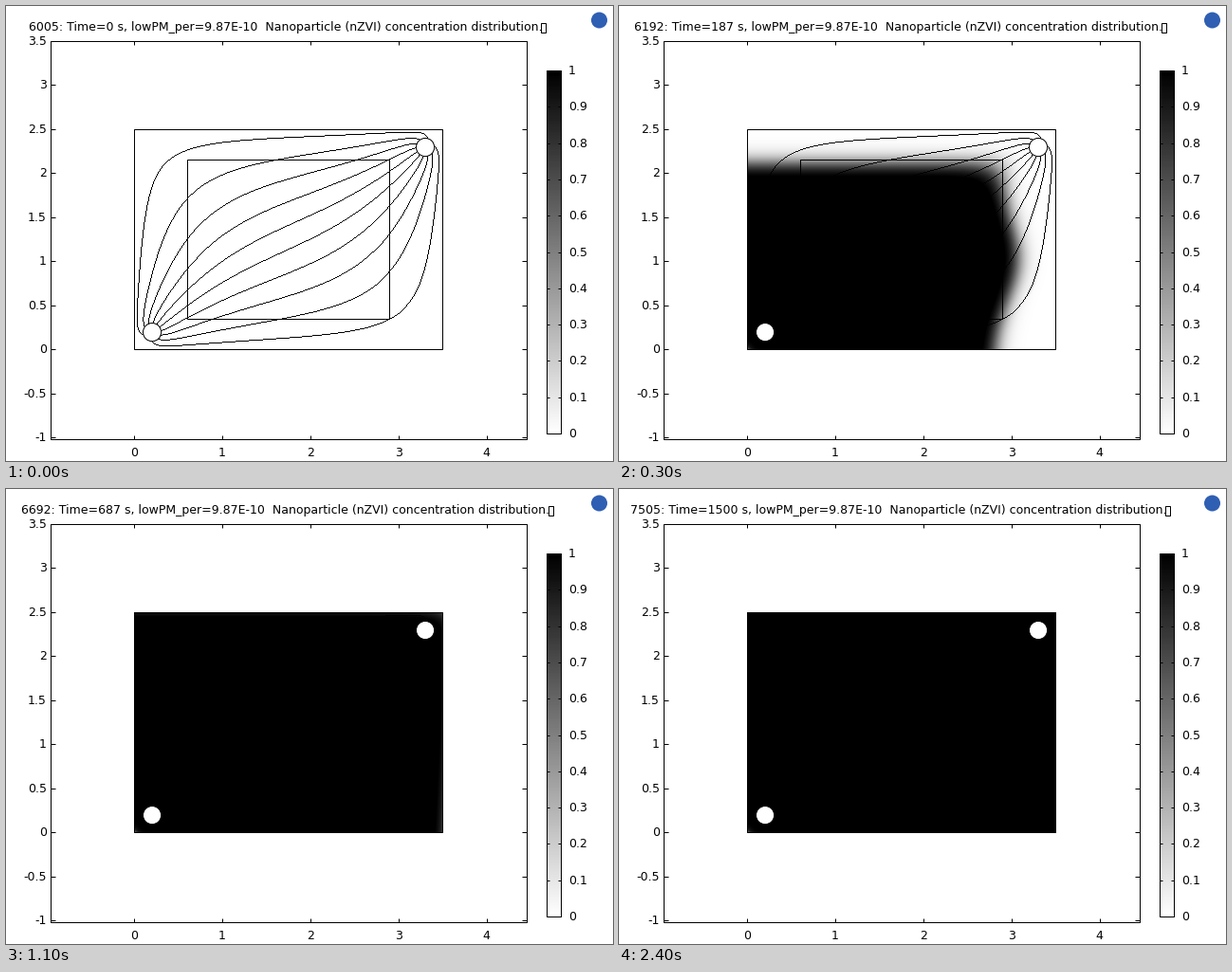
These frames come from a looping animation (640x480 px, 2.5 s). A matplotlib script:

```python
import numpy as np
import matplotlib.pyplot as plt
from matplotlib.animation import FuncAnimation
from matplotlib.patches import Circle, Rectangle

plt.rcParams["font.family"] = "DejaVu Sans"

DPI = 64
PX = 72 / DPI              # one pixel in points
FONT = 12.47 * PX
FRAMES, INTERVAL = 25, 100
SECONDS_PER_FRAME = 62.5
W, H = 3.5, 2.5            # reservoir size
INLET, OUTLET = 0.2 + 0.2j, 3.3 + 2.3j
RADIUS = 0.1
SCALE = 92.9               # pixels per unit


def px(x):
    return 135 + SCALE * x


def py(y):
    return 362.2 - SCALE * y


def pixel(v):
    return np.rint(v).astype(int)


X0, X1 = pixel(px(0)), pixel(px(W))
Y0, Y1 = pixel(py(H)), pixel(py(0))
SHAPE = (Y1 - Y0 + 1, X1 - X0 + 1)

fig = plt.figure(figsize=(640 / DPI, 480 / DPI), dpi=DPI, facecolor="white")
ax = fig.add_axes([0, 0, 1, 1])
ax.axis("off")


def box(x0, y0, x1, y1):
    ax.add_patch(Rectangle((x0, y0), x1 - x0, y1 - y0, fill=False,
                           ec="black", lw=PX, zorder=3))


def segment(x0, y0, x1, y1):
    ax.plot([x0, x1], [y0, y1], color="black", lw=PX, zorder=3,
            solid_capstyle="butt")


def label(x, baseline, text, ha):
    return ax.text(x, baseline, text, size=FONT, ha=ha, va="baseline")


def direction(z):
    """Flow between the wells, mirrored at the walls, in one-pixel steps."""
    v = np.zeros_like(z)
    for well, sign in ((INLET, 1), (OUTLET, -1)):
        for image in (well, well.conjugate(), -well, -well.conjugate()):
            for n in range(-4, 5):
                v += sign / np.tan(np.pi * (z - image - 2j * H * n) / (2 * W))
    v = np.conj(v)
    return v / np.maximum(abs(v.real), abs(v.imag)) / SCALE


def streamlines(count=10):
    """Mask of lines one pixel wide."""
    mask = np.zeros(SHAPE)
    start = np.deg2rad(225 - 360 * (0.042 + np.arange(count) / count))
    z = INLET + 0.006 * np.exp(1j * start)
    while z.size:
        mask[pixel(py(z.imag)) - Y0, pixel(px(z.real)) - X0] = 1
        z = z + direction(z + direction(z) / 2)
        z = z[abs(z - OUTLET) > 0.6 * RADIUS]
    return mask


# time, right reach, top reach, bulge, corner rounding, front softness
FRONT = np.array([
    (0, 0.2, 0.2, 0.0, 0.10, 0.05),
    (62, 1.65, 1.40, 0.10, 0.30, 0.080),
    (125, 2.25, 1.89, 0.36, 0.22, 0.075),
    (187, 2.80, 2.12, 0.22, 0.14, 0.060),
    (312, 3.20, 2.31, 0.02, 0.07, 0.045),
    (437, 3.40, 2.50, 0.00, 0.10, 0.050),
    (687, 3.56, 2.60, 0.00, 0.12, 0.060),
    (1000, 3.80, 2.90, 0.00, 0.10, 0.060),
])
gx, gy = np.meshgrid(np.linspace(0, W, SHAPE[1]), np.linspace(H, 0, SHAPE[0]))
corner = 0.6 * np.exp(-(gx + gy) / 0.03)
lines = streamlines()


def concentration(t):
    if t == 0:
        return np.zeros(SHAPE)
    right, top, bulge, k, soft = (np.interp(t, FRONT[:, 0], col)
                                  for col in FRONT.T[1:])
    reach = right + 0.05 * gy + bulge * np.exp(-((gy - 1.0) / 0.6) ** 2)
    d = k * np.logaddexp((gx - reach) / k, (gy - top) / k)
    c = 1.08 / (1 + np.exp(np.clip(d / soft, -50, 50)))
    return np.clip(np.minimum(c, 1) - corner, 0, 1)


# concentration map, wells and boundaries
field = ax.imshow(lines, cmap="gray_r", vmin=0, vmax=1,
                  extent=(X0, X1 + 1, Y1 + 1, Y0), aspect="auto",
                  interpolation="nearest", zorder=1)
box(px(0), py(0), px(W), py(H))
box(px(0.6), py(0.35), px(2.9), py(2.15))
for well in (INLET, OUTLET):
    ax.add_patch(Circle((px(well.real) + 0.5, py(well.imag) + 0.5),
                        RADIUS * SCALE + 0.3, fc="white", ec="black", lw=PX,
                        zorder=4))

# plot frame with inward ticks
LEFT, TOP, RIGHT, BOTTOM = 47, 37, 549, 457
box(LEFT, TOP, RIGHT, BOTTOM)
for x in range(5):
    segment(px(x), BOTTOM - 4, px(x), BOTTOM)
    segment(px(x), TOP, px(x), TOP + 4)
    label(px(x), 475, str(x), "center")
for y in np.arange(-1, 3.6, 0.5):
    segment(LEFT, py(y), LEFT + 5, py(y))
    segment(RIGHT - 5, py(y), RIGHT, py(y))
    label(43, py(y) + 4, f"{y:g}", "right")

# colour bar
BAR = (570, 68, 585, 451)
ax.imshow(np.linspace(1, 0, 383)[:, None], cmap="gray_r", vmin=0, vmax=1,
          extent=(BAR[0], BAR[2], BAR[3], BAR[1]), aspect="auto", zorder=1)
box(*BAR)
for i in range(11):
    y = BAR[3] - (BAR[3] - BAR[1]) * i / 10
    segment(BAR[0], y, BAR[0] + 3, y)
    segment(BAR[2] - 3, y, BAR[2], y)
    label(593, y + 4, f"{i / 10:g}", "left")

ax.add_patch(Circle((625.5, 15), 8.5, fc="#2f5fb3", ec="none"))

title = label(24, 26, "", "left")
glyph = Rectangle((564, 18), 5, 10, fill=False, ec="black", lw=PX)
ax.add_patch(glyph)
ax.set_xlim(0, 640)
ax.set_ylim(480, 0)


def update(i):
    t = int(i * SECONDS_PER_FRAME)
    half = 4 * len(str(t))     # the centred title grows both ways
    title.set_text(f"{6005 + t}: Time={t} s, lowPM_per=9.87E-10  "
                   "Nanoparticle (nZVI) concentration distribution.")
    title.set_x(27.5 - half)
    glyph.set_x(560 + half)
    field.set_data(np.maximum(concentration(t), lines))
    return title, glyph, field


anim = FuncAnimation(fig, update, frames=FRAMES, interval=INTERVAL,
                     repeat=True, repeat_delay=0, blit=False)
plt.show()
```
